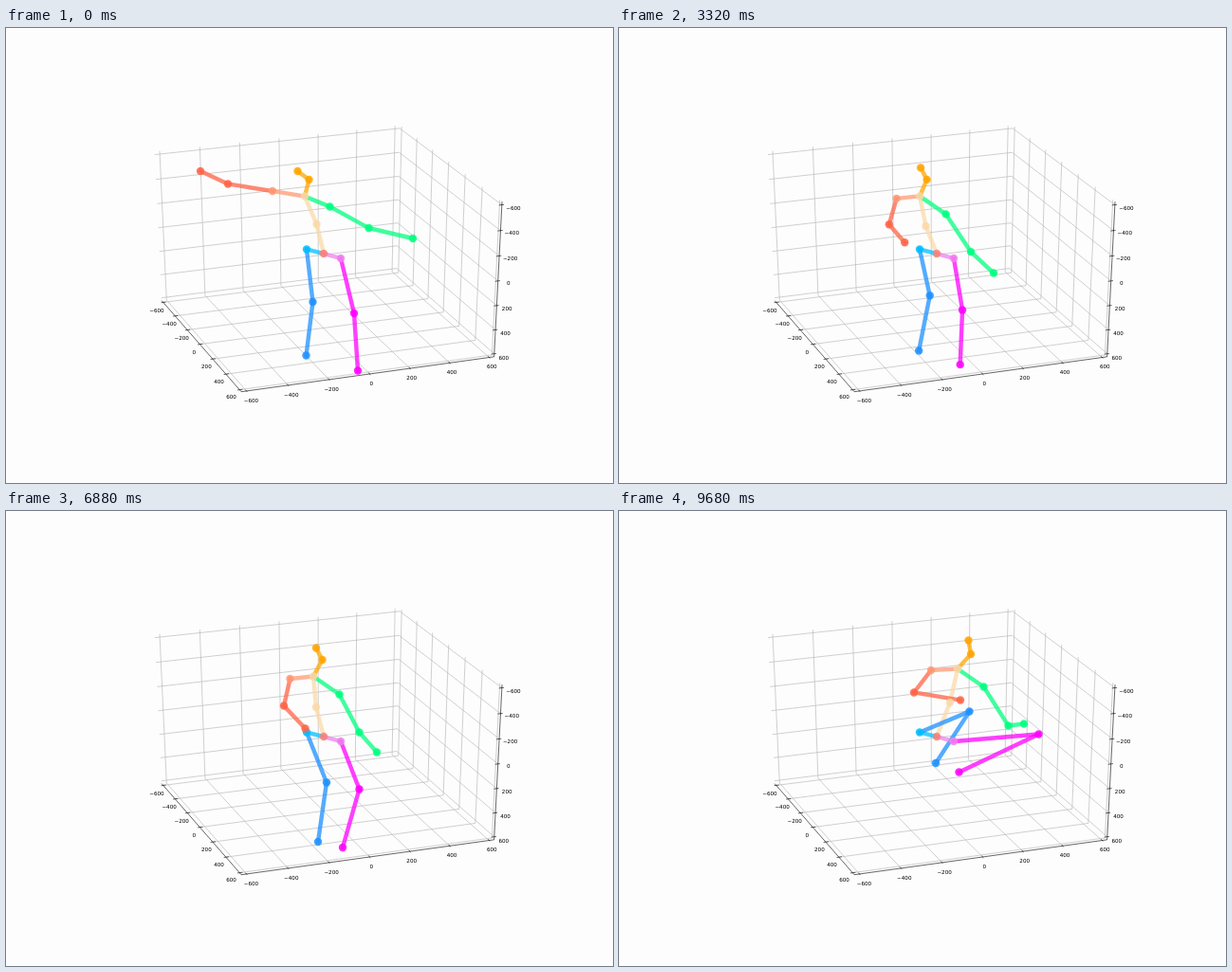
Recreate the animation shown at these times as an HTML page. Size 640 by 480 pixels, loop 9.72 s.

```html
<!DOCTYPE html>
<html lang="en">
<head>
<meta charset="utf-8">
<title>Skeleton motion</title>
<style>
  html, body { margin: 0; width: 100%; height: 100%; overflow: hidden; background: #fdfdfd; }
  svg { display: block; width: 640px; height: 480px; }
  text { font: 5.6px "DejaVu Sans", sans-serif; text-anchor: middle; fill: #000; }
  .grid { stroke: #b0b0b0; stroke-width: .6; }
  .axis { stroke: #000; stroke-width: .6; }
  .bone { stroke-width: 4.4; stroke-linecap: square; stroke-opacity: .75; }
  .joint { fill-opacity: .85; }
</style>
</head>
<body>
<svg id="stage" viewBox="0 0 640 480"></svg>
<script>
const LOOP = 9720, STEP = 40;
const stage = document.getElementById('stage');

function add(tag, attrs, content) {
  const el = document.createElementNS('http://www.w3.org/2000/svg', tag);
  set(el, attrs);
  if (content) el.textContent = content;
  return stage.appendChild(el);
}

function set(el, attrs) {
  for (const k in attrs) el.setAttribute(k, attrs[k]);
}

// Perspective view of the plot box: azimuth -110, elevation 28
const rad = Math.PI / 180;
const ca = Math.cos(20 * rad), sa = Math.sin(20 * rad);
const ce = Math.cos(28 * rad), se = Math.sin(28 * rad);

function project([x, y, z]) {
  const right = ca * x - sa * y;
  const away = sa * x + ca * y;
  const depth = 10 + away * ce - z * se;
  return [334.7 + 2681 * right / depth, 238 - 1920 * (away * se + z * ce) / depth];
}

function line(cls, a, b) {
  const [x1, y1] = project(a), [x2, y2] = project(b);
  add('line', { class: cls, x1, y1, x2, y2 });
}

function label(i, x, y) {
  const v = i * 200 - 600;
  add('text', { x, y: y + 2 }, v < 0 ? '\u2212' + -v : String(v));
}

const H = .5208, Z = .473, OUT = H + .0087, IN = H - .012;
for (let i = 0; i < 7; i++) {
  const v = (i - 3) / 6, z = -v * Z / H;
  line('grid', [v, -H, -Z], [v, H, -Z]);
  line('grid', [v, H, -Z], [v, H, Z]);
  line('grid', [-H, v, -Z], [H, v, -Z]);
  line('grid', [H, v, -Z], [H, v, Z]);
  line('grid', [-H, H, z], [H, H, z]);
  line('grid', [H, H, z], [H, -H, z]);
  line('axis', [v, -OUT, -Z], [v, -IN, -Z]);
  line('axis', [-OUT, v, -Z], [-IN, v, -Z]);
  line('axis', [IN, -H, z], [OUT, -H, z]);
  label(i, 258.5 + 42.3 * i, 393 - 5.95 * i);
  label(i, 159 + 13.1 * i, 297.5 + 14.2 * i + .17 * i * i);
  label(i, 535 - 1.7 * i, 190 + 26.4 * i);
}
line('axis', [-H, -H, -Z], [H, -H, -Z]);
line('axis', [-H, -H, -Z], [-H, H, -Z]);
line('axis', [H, -H, -Z], [H, -H, Z]);

// Movements that follow each other, each running from 0 to 1
const ramp = (t, a, b) => Math.min(1, Math.max(0, (t - a) / (b - a)));
const smooth = u => u * u * (3 - 2 * u);
const slowing = u => Math.sin(u * Math.PI / 2);

const moves = {
  drop: t => ramp(t, 1000, 2480) ** 2,
  step: t => slowing(ramp(t, 2480, 4160)),
  dip: t => Math.sin(Math.PI * ramp(t, 4160, 6760)) ** 2,
  stride: t => smooth(ramp(t, 4160, 6880)),
  sit: t => smooth(ramp(t, 6880, 7640)),
  lift: t => slowing(ramp(t, 7640, 9680))
};

const wheat = '#fad9a8', orange = '#ffa500', tomato = '#ff6347', salmon = '#ff9a76';
const green = '#00ff7f', sky = '#00bfff', blue = '#1e90ff', violet = '#ee82ee', magenta = '#ff00ff';

// Each bone hangs on its parent joint; every movement shifts its tip
const bones = [];
function bone(name, parent, color, rest, shifts = {}) {
  bones.push({ name, parent, rest, shifts, color, el: add('line', { class: 'bone', stroke: color }) });
}

bone('spine', 'pelvis', wheat, [-7.5, -31], { drop: [-4, 2], stride: [3.5, -2], sit: [16, -3], lift: [6, -2] });
bone('chest', 'spine', wheat, [-12.5, -29.5], { drop: [4, 0], step: [3, -3], dip: [-2, 4], stride: [2.5, 0], sit: [11, -3] });
bone('neck', 'chest', orange, [4.5, -17.5], { drop: [3, 0], stride: [2, 0], sit: [4.5, 2] });
bone('head', 'neck', orange, [-12, -9], { drop: [5.5, -3.5], sit: [4, -2] });

bone('hipR', 'pelvis', sky, [-18, -4.5]);
bone('kneeR', 'hipR', blue, [6.5, 55.5], { step: [6, -9.5], dip: [-4, 6], stride: [8.5, 7], sit: [17, -16.5], lift: [14.5, -58.5] });
bone('footR', 'kneeR', blue, [-7, 56.5], { step: [-6.5, 2.5], dip: [7, -1], stride: [4.5, 3.5], sit: [-3, 4.5], lift: [-23.5, -12.5] });
bone('hipL', 'pelvis', violet, [18, 5]);
bone('kneeL', 'hipL', magenta, [14, 58], { step: [-7, -5], dip: [-6, 3], stride: [12.5, -2.5], sit: [27.5, -10], lift: [42.5, -48] });
bone('footL', 'kneeL', magenta, [4, 60.5], { step: [-9, -4], dip: [4, 0], stride: [-12.5, 5], sit: [-23, -6], lift: [-43.5, -15.5] });

bone('shoulderL', 'chest', green, [26.5, 11], { drop: [1, 8] });
bone('elbowL', 'shoulderL', green, [41, 22.5], { drop: [-9, 16.5], step: [-8, 1], stride: [-3, 0], sit: [-4, 2], lift: [9, -1] });
bone('wristL', 'elbowL', green, [46.5, 11], { drop: [-9, 15], step: [-19, -5], sit: [-5, 0], lift: [3, -23] });
bone('shoulderR', 'chest', salmon, [-34, -5.5], { drop: [9.5, 8], lift: [-3.5, -1] });
bone('elbowR', 'shoulderR', tomato, [-47, -7.5], { drop: [36, 32], step: [4.5, 4], lift: [-11.5, -5] });
bone('wristR', 'elbowR', tomato, [-29, -13.5], { drop: [40.5, 28], step: [7, 6.5], stride: [4, 3], sit: [2.5, 3], lift: [24, -19] });

const dot = fill => add('circle', { class: 'joint', r: 4.2, fill });
set(dot('#fa8072'), { cx: 335, cy: 238 });
for (const b of bones) b.dot = dot(b.color);

function draw(t) {
  const joints = { pelvis: [335, 238] };
  for (const { name, parent, rest, shifts, el, dot } of bones) {
    const [x1, y1] = joints[parent];
    let x2 = x1 + rest[0], y2 = y1 + rest[1];
    for (const move in shifts) {
      const amount = moves[move](t);
      x2 += amount * shifts[move][0];
      y2 += amount * shifts[move][1];
    }
    joints[name] = [x2, y2];
    set(el, { x1, y1, x2, y2 });
    set(dot, { cx: x2, cy: y2 });
  }
}

const start = performance.now();
function tick() {
  const t = (performance.now() - start) % LOOP;
  draw(Math.floor(t / STEP) * STEP);
  requestAnimationFrame(tick);
}
tick();
</script>
</body>
</html>
```
